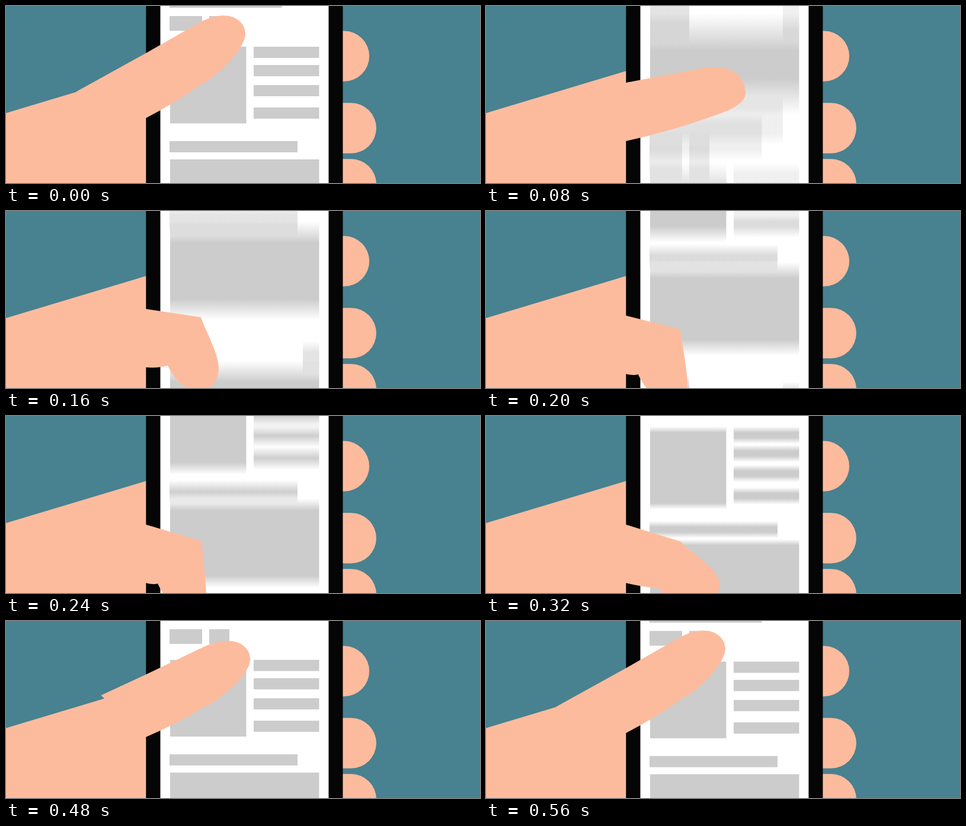
Recreate the animation shown at these times as an HTML page with a canvas. Size 800 by 300 pixels, loop 0.64 s.

```html
<!DOCTYPE html>
<html lang="en">
<head>
<meta charset="utf-8">
<title>Thumb scrolling a phone</title>
<style>
  html, body { margin: 0; width: 100%; height: 100%; overflow: hidden; background: #488190; }
  canvas { display: block; }
</style>
</head>
<body>
<canvas id="stage" width="800" height="300"></canvas>
<script>
const ctx = document.getElementById('stage').getContext('2d');
const LOOP = 640, STEP = 40, LAST = 14;
const TEAL = '#488190', SKIN = '#fdbb9d', BLACK = '#050505';
const PAGE = 680, DRAG_STEPS = 4, SPEED = 114;
const LEFT = 277, RIGHT = 528.5, BAR = 19;

// Page layout: left, top, right, bottom
const bar = (left, top, right) => [left, top, right, top + BAR];
const blocks = [
  [276, 17, 331, 42], [343, 17, 377, 42],
  [LEFT, 69, 405.5, 199],
  ...[69, 100, 134, 172].map(top => bar(418, top, RIGHT)),
  bar(276, 229, 492), [LEFT, 260, RIGHT, 391],
  [LEFT, 450, 343, 484], bar(501, 462, RIGHT),
  [LEFT, 496, RIGHT, 606],
  bar(276, 637, 501), bar(276, 664, 465.5)
];

// Thumb keys 80 ms apart: base height, knuckle, outermost tip, underside
const keys = [
  [80, 325, 29, 404, 47, 330, 132],
  [130, 357, 107, 438, 147, 362, 194],
  [166, 329, 180, 359, 266, 273, 262],
  [184, 330, 212, 338, 302, 256, 284],
  [184, 329, 213, 394, 285, 293, 292],
  [123, 352, 92, 437, 118, 352, 185]
];

const lerp = (a, b, u) => a + (b - a) * u;
const clamp = v => Math.max(0, Math.min(1, v));
const settle = u => keys[5].map((v, i) => lerp(v, keys[0][i], 1 - (1 - u) ** 2));

function spline(a, b, c, d, u) {
  return b + u / 2 * (c - a + u * (2 * a - 5 * b + 4 * c - d + u * (3 * (b - c) + d - a)));
}

function thumbKey(step) {
  if (step >= 10) return settle((step - 10) / 4);
  const k = Math.floor(step / 2), u = step / 2 - k;
  const at = n => n < 0 ? keys[0] : n > 5 ? settle(0.5) : keys[n];
  return at(k).map((v, i) => spline(at(k - 1)[i], v, at(k + 1)[i], at(k + 2)[i], u));
}

// Distance left to scroll: a steady drag, then a decaying fling
function remaining(step) {
  if (step < DRAG_STEPS) return PAGE - SPEED * step;
  const u = Math.min(1, (step - DRAG_STEPS) / 12);
  return (PAGE - SPEED * DRAG_STEPS) * (1 - u) ** 3.9;
}

function fillRect(color, x, y, w, h) {
  ctx.fillStyle = color;
  ctx.fillRect(x, y, w, h);
}

function fillPath(build) {
  ctx.fillStyle = SKIN;
  ctx.beginPath();
  build();
  ctx.fill();
}

// A block smeared vertically by a box filter of the given length
function drawBlock(left, top, right, bottom, blur) {
  const h = bottom - top, total = h + blur, y = top - blur / 2;
  if (y > 300 || y + total < 0) return;
  if (blur < 0.6) {
    fillRect('rgb(51,51,51)', left, top, right - left, h);
    return;
  }
  const ramp = Math.min(h, blur) / total;
  const peak = `rgba(51,51,51,${Math.min(1, h / blur)})`, clear = 'rgba(51,51,51,0)';
  const g = ctx.createLinearGradient(0, y, 0, y + total);
  g.addColorStop(0, clear);
  g.addColorStop(ramp, peak);
  g.addColorStop(1 - ramp, peak);
  g.addColorStop(1, clear);
  fillRect(g, left, y, right - left, total);
}

function drawPage(step) {
  const blur = step ? 0.55 * (remaining(step) - remaining(step + 1)) : 0;
  ctx.save();
  // Difference on white subtracts, so overlapping smears add up
  ctx.globalCompositeOperation = 'difference';
  for (const [left, top, right, bottom] of blocks) {
    for (const turn of [-1, 0, 1]) {
      const shift = turn * PAGE - remaining(step);
      drawBlock(left, top + shift, right, bottom + shift, blur);
    }
  }
  ctx.restore();
}

function drawHand() {
  fillPath(() => {
    ctx.moveTo(0, 181.5);
    ctx.lineTo(237, 110);
    ctx.lineTo(237, 300);
    ctx.lineTo(0, 300);
  });
  const r = 42.7;
  for (const [x, y] of [[570.5, 85], [582.3, 207], [582.3, 302]]) {
    fillPath(() => {
      ctx.moveTo(560, y - r);
      ctx.arc(x, y, r, -Math.PI / 2, Math.PI / 2);
      ctx.lineTo(560, y + r);
    });
  }
}

function drawThumb([baseY, kx, ky, tx, ty, ux, uy]) {
  const baseX = 236;
  const raised = Math.max(0, (110 - baseY) / 30);
  const bend = clamp((ty - ky - 42) / 30);
  const lowY = baseY + 99 + 11 * raised;
  // A straight thumb leaves the knuckle along its back, a bent one towards the tip
  const reach = lerp(0.5, 0.35, bend);
  const outX = kx + reach * lerp(kx - baseX, tx - kx, bend);
  const outY = ky + reach * lerp(ky - baseY, ty - ky, bend);
  fillPath(() => {
    ctx.moveTo(baseX - 118 * raised, lerp(baseY, 145.5, clamp(raised)));
    ctx.lineTo(baseX, baseY);
    ctx.lineTo(kx, ky);
    ctx.bezierCurveTo(outX, outY, tx - 1, ty - 27, tx, ty);
    ctx.bezierCurveTo(tx, ty + lerp(26, 46, bend), ux + lerp(23, 30, bend), uy + lerp(-9, 63, bend), ux, uy);
    ctx.quadraticCurveTo((ux + baseX) / 2 + 3, (uy + lowY) / 2 + 3, baseX, lowY);
  });
}

function draw(now) {
  const step = Math.min(LAST, Math.floor((now % LOOP) / STEP));
  fillRect(TEAL, 0, 0, 800, 300);
  drawHand();
  fillRect(BLACK, 236.3, 0, 332.2, 300);
  fillRect('#fff', 260.5, 0, 284, 300);
  drawPage(step);
  drawThumb(thumbKey(step));
}

const start = performance.now();
function tick() {
  draw(performance.now() - start);
  requestAnimationFrame(tick);
}
tick();
</script>
</body>
</html>
```
